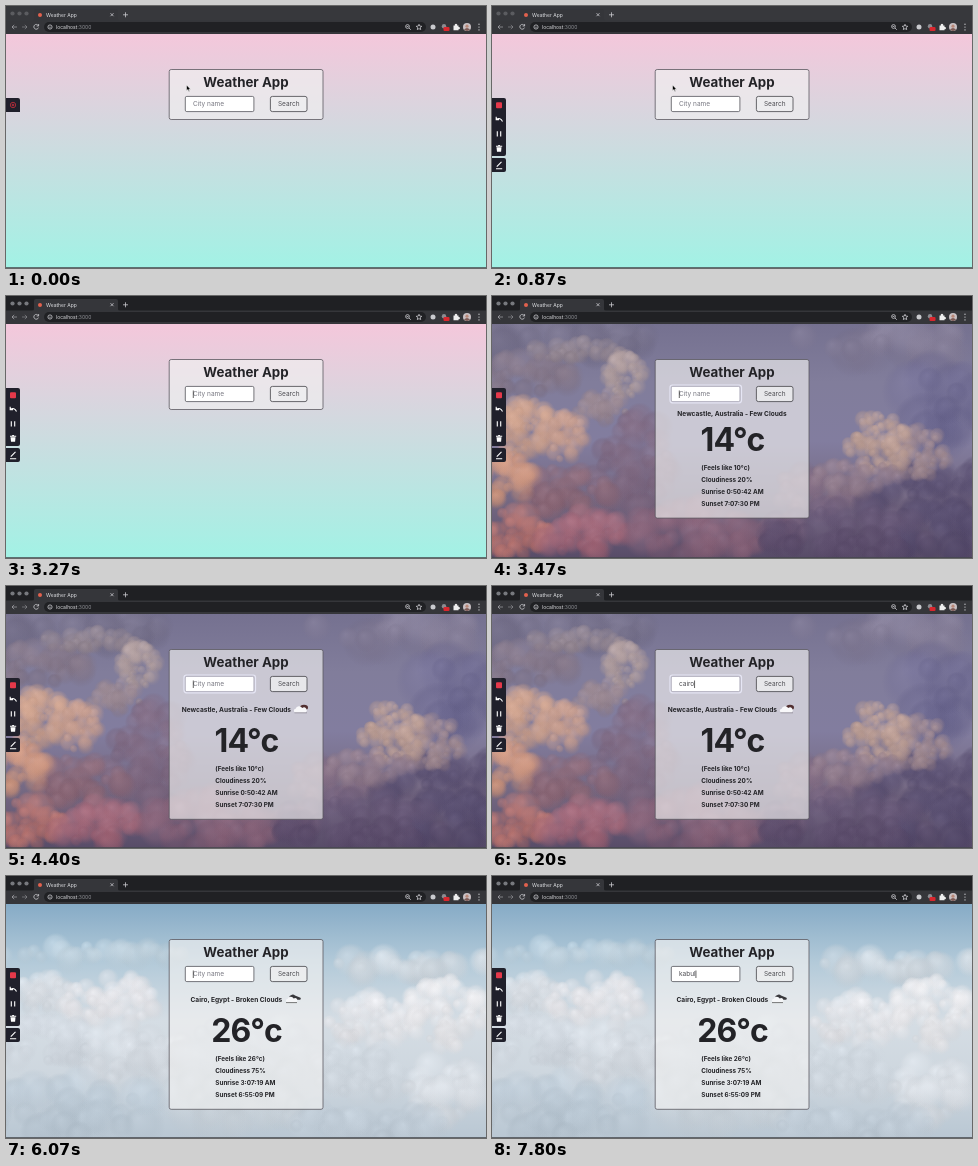
Recreate the animation shown at these times as an HTML page with a canvas. Size 480x262 px, loop 8 s.

```html
<!DOCTYPE html>
<html lang="en">
<head>
<meta charset="utf-8">
<title>Weather App</title>
<style>
  html, body { margin: 0; width: 100%; height: 100%; overflow: hidden; }
  body { position: relative; background: linear-gradient(#f4c7db 28px, #a2f2e5 262px); }
  canvas, svg { position: absolute; inset: 0; width: 100%; height: 100%; display: block; }
  text { font-family: Inter, "Open Sans", sans-serif; fill: #232327; white-space: pre; }
  .title { font-size: 13.3px; font-weight: 700; text-anchor: middle; }
  .info { font-size: 6.35px; font-weight: 700; }
  .place { font-size: 6.55px; font-weight: 700; text-anchor: middle; }
  .temp { font-size: 32px; font-weight: 700; letter-spacing: -1px; text-anchor: middle; }
  .field { font-size: 6.5px; fill: #4b4b50; }
  .bar { font-size: 5px; fill: #dcdde0; }
  .line { fill: none; stroke: #c9cace; stroke-width: .8; }
  .tool { fill: none; stroke: #fff; stroke-width: 1.1; }
</style>
</head>
<body>
<canvas id="sunset" width="480" height="262"></canvas>
<canvas id="daylight" width="480" height="262"></canvas>

<svg viewBox="0 0 480 262" preserveAspectRatio="none">
  <!-- browser -->
  <rect id="strip" width="480" height="15"/>
  <path d="M26 15q2 0 2-2V5q0-2 2-2h80q2 0 2 2v8q0 2 2 2z" fill="#35363a"/>
  <g id="lights"><circle cx="6.5" cy="7.5" r="2.1"/><circle cx="13.5" cy="7.5" r="2.1"/><circle cx="20.5" cy="7.5" r="2.1"/></g>
  <circle cx="34" cy="9" r="2" fill="#e2614d"/>
  <text class="bar" x="40" y="10.7">Weather App</text>
  <path class="line" d="M104.5 7.2l3 3m0-3l-3 3M117 8.8h5m-2.5-2.5v5"/>
  <rect y="14.5" width="480" height="13.5" fill="#35363a"/>
  <rect x="38" y="16" width="382" height="10" rx="5" fill="#202124"/>
  <path class="line" d="M11 21H6m2.2-2.2L6 21l2.2 2.2" opacity=".65"/>
  <path class="line" d="M16 21h5m-2.2-2.2L21 21l-2.2 2.2" opacity=".45"/>
  <path class="line" d="M32.3 19.6a2.4 2.4 0 1 0 .2 2M32.6 18v2h-2"/>
  <circle class="line" cx="44" cy="21" r="2.1"/>
  <path class="line" d="M44 20.6v1.5"/>
  <text class="bar" x="50" y="22.8">localhost<tspan fill="#92949a">:3000</tspan></text>
  <circle class="line" cx="401.5" cy="20.5" r="1.9"/>
  <path class="line" d="M403 22l1.8 1.8M400.6 20.5h1.8"/>
  <path class="line" d="M413 18.3l.8 1.8 2 .2-1.5 1.3.4 2-1.7-1-1.7 1 .4-2-1.5-1.3 2-.2z"/>
  <circle cx="427" cy="21" r="2.5" fill="#c9cace"/>
  <circle cx="438" cy="20.3" r="2.2" fill="#8b8c91"/>
  <rect x="437.5" y="21" width="6" height="4" rx="1" fill="#d9272e"/>
  <path d="M447.5 19.5h1.4a1.2 1.2 0 1 1 2.2 0h1.4v1.6a1.1 1.1 0 1 1 0 2.1v1h-5z" fill="#eee"/>
  <circle cx="461" cy="21" r="4" fill="#c8c0c4"/>
  <path d="M458 23.6q3-3 6 0a4 4 0 0 1-6 0" fill="#7d5a55"/>
  <circle cx="461" cy="20.2" r="1.6" fill="#b98878"/>
  <path d="M473 18.2v.1m0 2.7v.1m0 2.7v.1" stroke="#dcdde0" stroke-width="1.2" stroke-linecap="round"/>
  <rect y="261" width="480" height="1" fill="#44474c" opacity=".75"/>

  <!-- card -->
  <rect id="card" x="163.2" y="63.5" width="153.8" rx="2" fill="#f1f1f2" fill-opacity=".65" stroke="#5b5960" stroke-width=".8"/>
  <text class="title" x="240" y="80.5">Weather App</text>
  <rect id="halo" x="178" y="89" width="71.5" height="17.8" rx="2.5" fill="none" stroke="#e6e6f5" stroke-width="1.2"/>
  <rect id="input" x="179.3" y="90.4" width="68.6" height="15.2" rx="1.5" fill="#fff" stroke-width=".8"/>
  <text id="entry" class="field" x="187" y="100.4"></text>
  <path id="caret" d="M0 94.5v7.5" stroke="#222" stroke-width=".7"/>
  <rect x="264.4" y="90.4" width="36.6" height="15.2" rx="2" fill="#efeff1" fill-opacity=".8" stroke="#454549" stroke-width=".8"/>
  <text class="field" x="282.7" y="100.4" text-anchor="middle">Search</text>

  <g id="result">
    <text id="place" class="place"></text>
    <g id="moon">
      <ellipse cx="298" cy="121.5" rx="4" ry="2.8" fill="#512f30"/>
      <path d="M289 126.5a2 2 0 0 1 .6-3.8 3.6 3.6 0 0 1 6.6-.6 2.4 2.4 0 0 1 3.4 4.4z" fill="#f8f8fa"/>
      <path d="M288.5 126.8h12.5" stroke="#66616a" stroke-width=".5"/>
    </g>
    <g id="broken">
      <path d="M284 122.8a2 2 0 0 1 1-3.5q2.2-1.6 4 .3l5.5 2.2q1 1.4-.5 2h-4z" fill="#38383c"/>
      <path d="M281 126.4a1.9 1.9 0 0 1 .7-3.6 3.4 3.4 0 0 1 6-.4 2.3 2.3 0 0 1 2.6 4z" fill="#f5f6f8"/>
      <path d="M280 126.6h11" stroke="#444" stroke-width=".7"/>
    </g>
    <g id="facts">
      <text id="temp" class="temp" x="240.5" y="155"></text>
      <text class="info fact" x="209.3" y="173.6"></text>
      <text class="info fact" x="209.3" y="185.9"></text>
      <text class="info fact" x="209.3" y="198.2"></text>
      <text class="info fact" x="209.3" y="210.4"></text>
    </g>
  </g>

  <!-- recorder -->
  <clipPath id="panelClip"><rect id="panelSize" y="92" width="15"/></clipPath>
  <g clip-path="url(#panelClip)">
    <path d="M0 92h12q2 0 2 2v54q0 2-2 2H0zM0 152h12q2 0 2 2v10q0 2-2 2H0z" fill="#20202b"/>
    <g id="tools">
      <rect x="4" y="96.3" width="6" height="6" rx="1" fill="#e5394a"/>
      <path class="tool" d="M4.2 110.8v2.8h2.8M4.3 113.4q4-2.3 6.2 2"/>
      <path class="tool" d="M5.3 125.2v5.4m3.4-5.4v5.4" stroke-width="1.6"/>
      <path d="M4 139.7h2l.4-.8h1.4l.4.8h2v1H4zM4.5 141.3h5l-.4 4.4H5z" fill="#fff"/>
      <path class="tool" d="M4 162.7h6.2M4.8 160.6l4.7-4.7"/>
    </g>
    <g id="idle" fill="none" stroke="#a52c39"><circle cx="7" cy="99" r="2.7"/><circle cx="7" cy="99" r=".9" fill="#a52c39"/></g>
  </g>

  <path id="arrow" d="M0 0v5.8l1.4-1.2.9 2 .9-.4-.9-2h1.8z" stroke="#fff" stroke-width=".5"/>
  <path id="beam" d="M-1.2-3.2q1.2 0 1.2 1V2q0 1-1.2 1m2.4-6.2Q0-3.2 0-2.2M0 2q0 1 1.2 1" fill="none" stroke="#333" stroke-width=".6"/>
</svg>

<script>
const LOOP = 8000;
const $ = id => document.getElementById(id);
const set = (id, attrs) => { for (const k in attrs) $(id).setAttribute(k, attrs[k]); };
const show = (id, on) => { $(id).style.display = on ? "" : "none"; };
const ramp = (t, from, to) => Math.min(1, Math.max(0, (t - from) / (to - from)));

function seeded(seed) {
  return () => (seed = (seed * 16807) % 2147483647) / 2147483647;
}

// Each bank: x, y, half width, half height, colour, puff radius
function paintSky(id, stops, banks, seed) {
  const ctx = $(id).getContext("2d"), rand = seeded(seed);
  const sky = ctx.createLinearGradient(0, 28, 0, 262);
  stops.forEach((c, i) => sky.addColorStop(i / (stops.length - 1), c));
  ctx.fillStyle = sky;
  ctx.fillRect(0, 28, 480, 234);
  for (const [x, y, w, h, colour, size] of banks) {
    const rgb = [1, 3, 5].map(i => parseInt(colour.slice(i, i + 2), 16));
    const count = Math.ceil(w * h / (size * size) * 6) + 6;
    for (let i = 0; i < count; i++) {
      const a = rand() * Math.PI * 2, d = Math.sqrt(rand());
      const px = x + Math.cos(a) * d * w, py = y + Math.sin(a) * d * h;
      const r = size * (.4 + rand() * .8);
      const shade = -Math.sin(a) * d * 8 + (rand() - .5) * 16;
      const tone = (lift, alpha) => `rgba(${rgb.map(v => Math.round(v + shade + lift))},${alpha})`;
      const g = ctx.createRadialGradient(px - r * .25, py - r * .35, 0, px, py, r);
      g.addColorStop(0, tone(10, .5));
      g.addColorStop(.65, tone(-5, .38));
      g.addColorStop(1, tone(-12, 0));
      ctx.fillStyle = g;
      ctx.fillRect(px - r, py - r, r * 2, r * 2);
    }
  }
}

paintSky("sunset", ["#757190", "#817d9b", "#827d9f", "#756983", "#584c68"], [
  [60, 45, 110, 14, "#77728c", 24],
  [400, 45, 110, 14, "#88819b", 24],
  [450, 110, 50, 30, "#6e6a92", 28],
  [30, 78, 50, 20, "#87798a", 14],
  [85, 55, 50, 10, "#988b96", 10],
  [132, 78, 20, 24, "#b29f9f", 8],
  [110, 112, 28, 16, "#9c8a94", 10],
  [140, 175, 42, 55, "#806a82", 16],
  [75, 195, 45, 24, "#8f6c7b", 13],
  [32, 132, 38, 26, "#cfa38e", 10],
  [72, 142, 22, 24, "#c79e90", 9],
  [14, 180, 28, 26, "#d29b84", 12],
  [18, 238, 40, 22, "#bf7872", 13],
  [90, 240, 50, 20, "#a4697a", 14],
  [220, 238, 80, 26, "#8d687e", 17],
  [325, 195, 40, 24, "#877086", 14],
  [442, 215, 68, 50, "#5a5072", 18],
  [428, 158, 28, 24, "#a38c92", 8],
  [385, 148, 32, 28, "#bd9f95", 8],
  [365, 182, 42, 14, "#958090", 10],
  [350, 238, 90, 24, "#625372", 16]
], 41);

paintSky("daylight", ["#86abc6", "#b3cad9", "#d5dde4", "#cdd6de", "#b9c7d3"], [
  [80, 78, 110, 7, "#c3d4df", 14],
  [410, 90, 90, 9, "#d3dbe2", 15],
  [30, 118, 38, 18, "#d9dee4", 11],
  [105, 125, 48, 26, "#e6e6ea", 11],
  [40, 165, 55, 22, "#d2d9e1", 14],
  [130, 180, 60, 26, "#d5dbe2", 15],
  [70, 235, 100, 25, "#bac8d4", 20],
  [240, 200, 80, 60, "#cdd6de", 24],
  [365, 145, 46, 24, "#e4e5e9", 11],
  [440, 138, 42, 34, "#e7e7ea", 11],
  [360, 195, 55, 24, "#d0d8e0", 15],
  [445, 215, 50, 28, "#d9dee4", 16],
  [360, 250, 80, 16, "#c0ccd7", 18]
], 97);

const reports = {
  newcastle: ["Newcastle, Australia - Few Clouds", "14°c", "(Feels like 10°c)", "Cloudiness 20%", "Sunrise 0:50:42 AM", "Sunset 7:07:30 PM"],
  cairo: ["Cairo, Egypt - Broken Clouds", "26°c", "(Feels like 26°c)", "Cloudiness 75%", "Sunrise 3:07:19 AM", "Sunset 6:55:09 PM"]
};
// word, first key, time per key, submit
const typing = [
  ["newcastle", 1930, 75, 3200],
  ["cairo", 4670, 120, 5670],
  ["kabul", 7130, 135, LOOP]
];
const FOCUS = 1400, FIRST = 3400, FIRST_ICON = 4130, SECOND = 5870, SECOND_ICON = 6070;
const BLINK = 530;

const edits = [FOCUS, ...typing.flatMap(([word, start, step, end]) =>
  [...[...word].map((_, i) => start + i * step), end])];

function typed(t) {
  const run = typing.find(([, start, , end]) => t >= start && t < end);
  return run ? run[0].slice(0, 1 + Math.floor((t - run[1]) / run[2])) : "";
}

function caretOn(t) {
  const last = Math.max(...edits.filter(e => e <= t));
  return t >= FOCUS && Math.floor((t - last) / BLINK) % 2 === 0;
}

function draw(t) {
  const active = t >= FOCUS;
  set("strip", { fill: active ? "#1f2023" : "#37383c" });
  set("lights", { fill: active ? "#77797e" : "#5b5c60" });

  const grow = 1 - (1 - ramp(t, 70, 600)) ** 2;
  set("panelSize", { height: 14 + 60 * grow });
  show("tools", grow > 0);
  show("idle", grow === 0);

  const move = ramp(t, 870, FOCUS), ease = move * move * (3 - 2 * move);
  const pointer = { transform: `translate(${180.5 + 20 * ease} ${79 + 19 * ease})` };
  const overInput = 79 + 19 * ease > 90;
  set("arrow", pointer);
  set("beam", pointer);
  show("arrow", !overInput);
  show("beam", overInput && t < typing[0][1]);

  const hasResult = t >= FIRST, hasIcon = t >= FIRST_ICON, second = t >= SECOND;
  show("sunset", hasResult && !second);
  show("daylight", second);

  const text = typed(t), entry = $("entry");
  entry.textContent = text || "City name";
  entry.style.fill = text ? "#4b4b50" : "#777780";
  set("caret", { transform: `translate(${187.3 + (text ? entry.getComputedTextLength() : 0)} 0)` });
  show("caret", caretOn(t));
  const ring = hasResult && !second;
  show("halo", ring);
  set("input", { stroke: ring ? "#aaa8b8" : "#55555b" });

  set("card", { height: !hasResult ? 50 : hasIcon ? 169.8 : 158.6 });
  show("result", hasResult);
  if (!hasResult) return;
  show("moon", hasIcon && t < SECOND_ICON);
  show("broken", t >= SECOND_ICON);
  const [place, temp, ...facts] = reports[second ? "cairo" : "newcastle"];
  $("place").textContent = place;
  set("place", { x: hasIcon ? 230.4 : 240, y: hasIcon ? 125.7 : 120 });
  $("temp").textContent = temp;
  set("facts", { transform: `translate(0 ${hasIcon ? 11 : 0})` });
  document.querySelectorAll(".fact").forEach((el, i) => { el.textContent = facts[i]; });
}

const begin = performance.now();
function tick() {
  draw((performance.now() - begin) % LOOP);
  requestAnimationFrame(tick);
}
tick();
</script>
</body>
</html>
```
